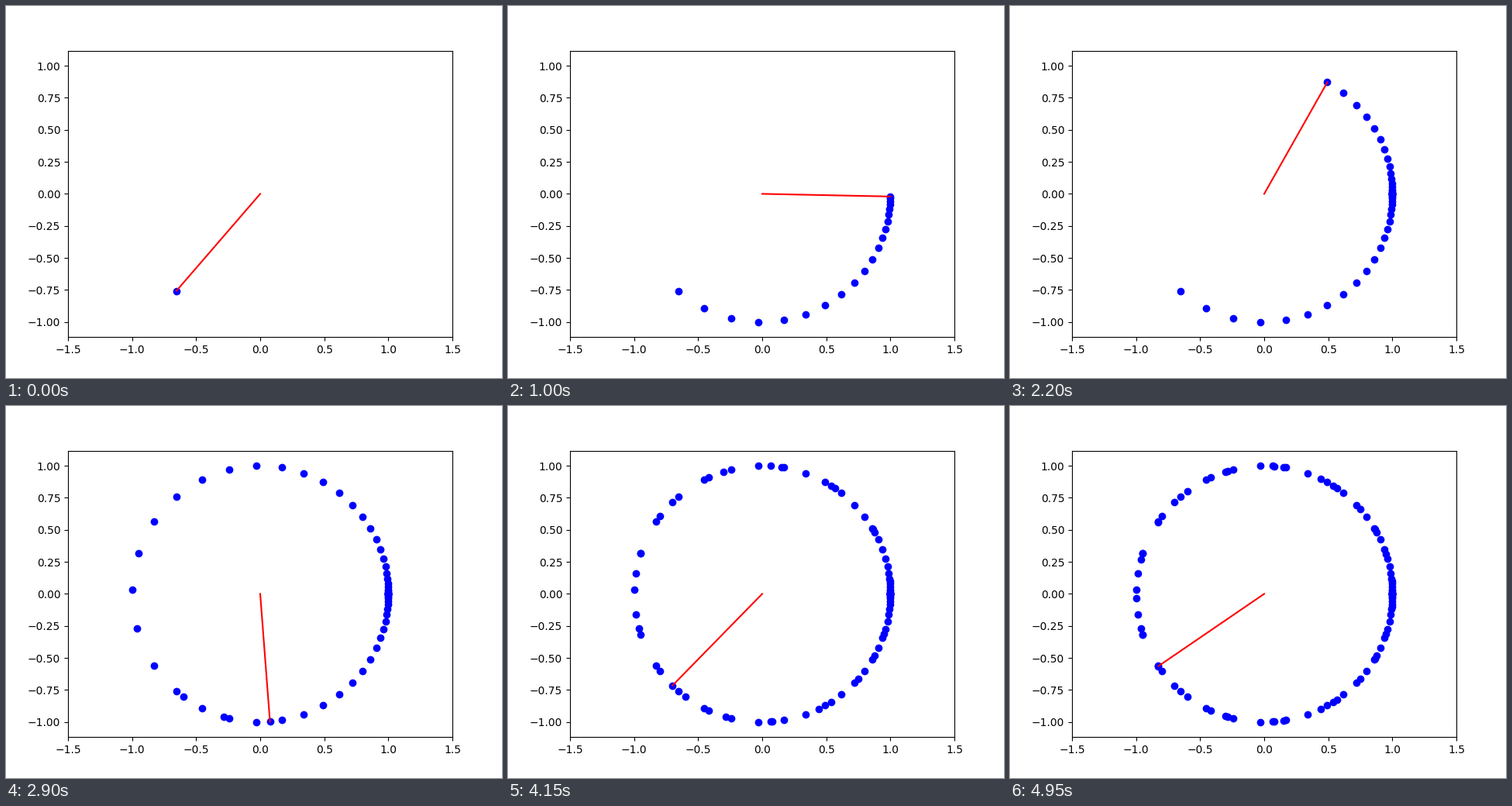
Write a matplotlib script that moves like this. It is 640 px wide and 480 px high and loops after 5000 ms.

```python
import numpy as np
import matplotlib.pyplot as plt
from matplotlib.animation import FuncAnimation

FRAMES = 100
INTERVAL = 50  # ms

# Angle whose speed swings smoothly between 0 and its maximum once per loop.
t = 2 * np.pi * np.arange(FRAMES) / FRAMES
angle = 4 * (t + np.cos(t))
x, y = np.cos(angle), np.sin(angle)

fig, ax = plt.subplots(figsize=(6.4, 4.8), dpi=100)
ax.set_aspect("equal", adjustable="datalim")
half_height = 1.5 * 369.6 / 496  # same scale on both axes
ax.set_xlim(-1.5, 1.5)
ax.set_ylim(-half_height, half_height)

trail, = ax.plot([], [], "bo")
arm, = ax.plot([], [], "r-")


def update(i):
    trail.set_data(x[:i + 1], y[:i + 1])
    arm.set_data([0, x[i]], [0, y[i]])
    return trail, arm


def init():
    return update(0)


anim = FuncAnimation(fig, update, frames=FRAMES, init_func=init,
                     interval=INTERVAL, repeat=True, repeat_delay=0)
plt.show()
```
